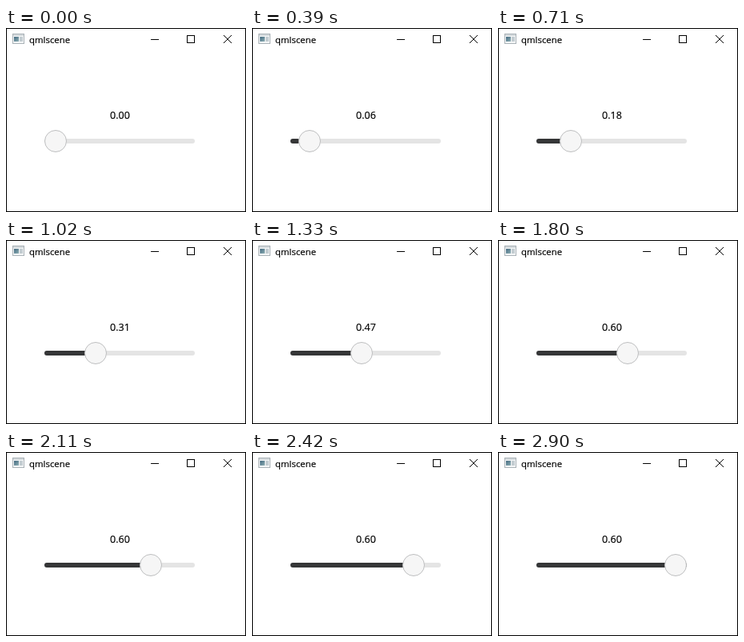
An HTML page that plays this animation: 300 by 231 pixels, repeating every 3590 ms.

```html
<!DOCTYPE html>
<html lang="en">
<head>
<meta charset="utf-8">
<title>Slider</title>
<style>
html, body { margin: 0; width: 100%; height: 100%; overflow: hidden; background: #fff; }
svg { display: block; }
text { font-family: "Open Sans", "Noto Sans", sans-serif; stroke: #000; stroke-width: .2px; }
</style>
</head>
<body>
<svg width="300" height="231" viewBox="0 0 300 231">
  <defs>
    <linearGradient id="pane" x2="1" y2="1">
      <stop stop-color="#41687f"/>
      <stop offset="1" stop-color="#8fb0b5"/>
    </linearGradient>
  </defs>
  <rect x=".5" y=".5" width="299" height="230" fill="#fff" stroke="#000"/>

  <!-- title bar -->
  <rect x="8.5" y="7.5" width="14" height="12" fill="#f4f6f7" stroke="#a9b1b6"/>
  <rect x="9" y="8" width="13" height="2" fill="#d3d9dc"/>
  <rect x="10" y="11" width="6" height="6" fill="url(#pane)"/>
  <rect x="17" y="11" width="4" height="6" fill="#c3ccd1"/>
  <text x="29" y="19" font-size="11.4">qmlscene</text>
  <g fill="none" stroke="#000">
    <path d="M181 14.5h10"/>
    <rect x="226.5" y="9.5" width="9" height="9"/>
    <path d="M272 9l10 10m0-10l-10 10"/>
  </g>

  <!-- slider -->
  <text id="label" x="142.5" y="114" font-size="12.5" text-anchor="middle">0.00</text>
  <rect x="48" y="139" width="188" height="6" rx="3" fill="#e4e4e4"/>
  <rect id="fill" x="48" y="139" width="0" height="6" rx="3" fill="#353637"/>
  <circle id="knob" cx="62" cy="142" r="13.5" fill="#f6f6f6" stroke="#bdbebf"/>
</svg>
<script>
const LOOP = 3590, STEP = 77, START = 62, TRAVEL = 160, MAX_VALUE = 0.6;
// Bursts of movement: start time and number of steps
const bursts = [[310, 7], [866, 7], [1480, 7], [2030, 7], [2590, 2], [2820, 2]];
// Knob path: steps taken and x, linear in between
const path = [[0, START], [6, 91], [7, 95], [10, 112], [14, 137],
              [19, 162], [21, 171], [27, 202], [28, 210], [32, 222]];
const [label, fill, knob] = ["label", "fill", "knob"].map(id => document.getElementById(id));
const clamp = (v, lo, hi) => Math.min(Math.max(v, lo), hi);

function stepsAt(t) {
  return bursts.reduce((sum, [start, count]) =>
    sum + clamp(Math.floor((t - start) / STEP) + 1, 0, count), 0);
}

function knobAt(step) {
  const i = Math.max(1, path.findIndex(([s]) => s >= step));
  const [s0, x0] = path[i - 1], [s1, x1] = path[i];
  return Math.round(x0 + (x1 - x0) * (step - s0) / (s1 - s0));
}

function draw(now) {
  const x = knobAt(stepsAt(now % LOOP));
  const position = (x - START) / TRAVEL;
  knob.setAttribute("cx", x);
  fill.setAttribute("width", position * 188);
  label.textContent = Math.min(position, MAX_VALUE).toFixed(2);
  requestAnimationFrame(draw);
}
draw(performance.now());
</script>
</body>
</html>
```
